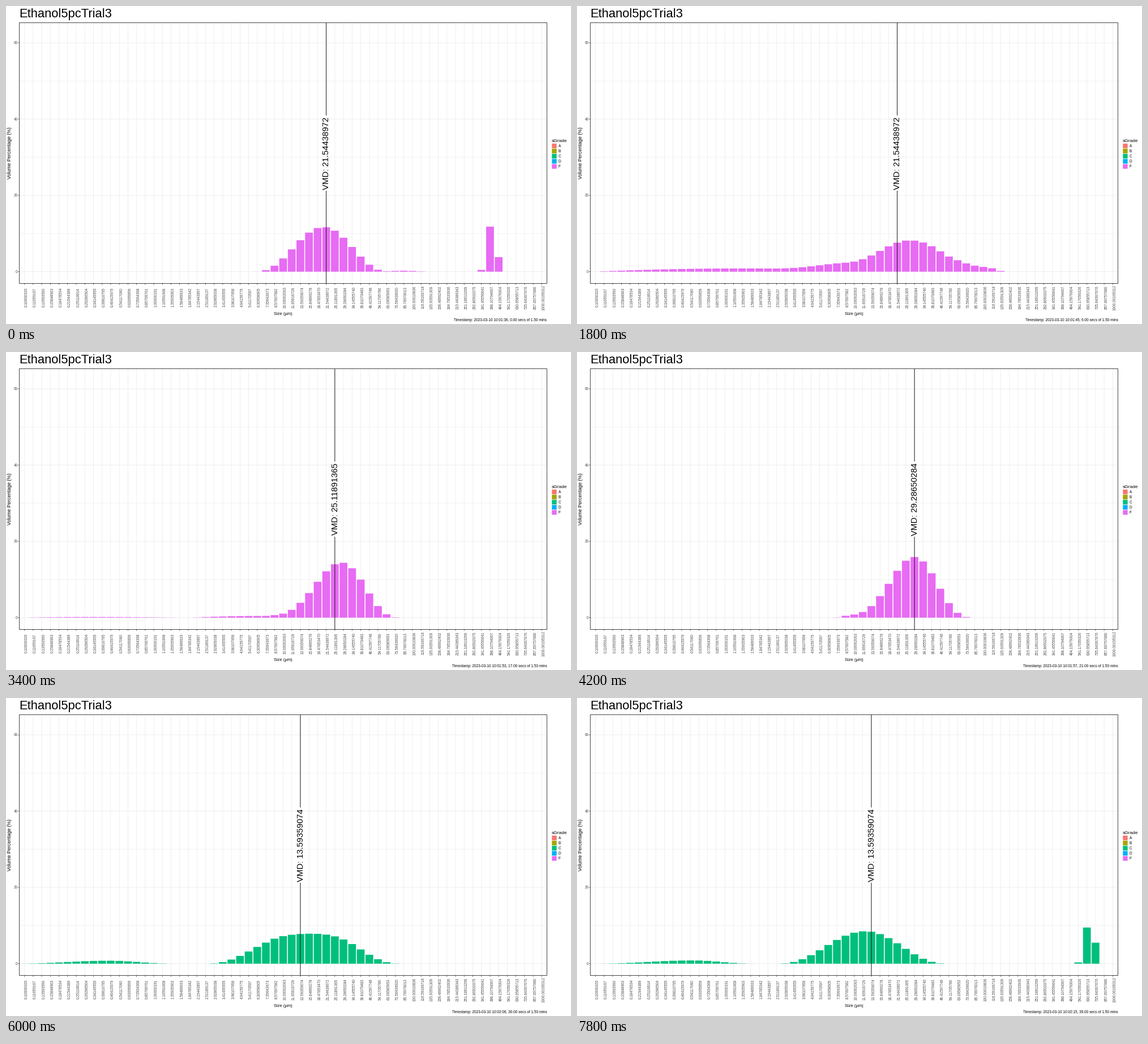
Write a matplotlib script that moves like this. It is 998 by 561 pixels and loops after 8000 ms.

```python
import numpy as np
import matplotlib.pyplot as plt
from matplotlib.animation import FuncAnimation
from matplotlib.patches import Rectangle

W, H, DPI = 998, 561, 64
PT = 72 / DPI                        # points per pixel
LEFT, RIGHT, TOP, BOTTOM = 23.5, 955.5, 29.5, 489.5
BINS = 61
STEP = (RIGHT - LEFT) / (BINS + 0.2)
ZERO, UNIT = 468.7, 6.728            # pixel row of 0 % and pixels per 1 %
SECONDS, BLANK = 40, 26
GRADES = dict(A="#F8766D", B="#A3A500", C="#00BF7D", D="#00B0F6", F="#E76BF3")

plt.rcParams["font.family"] = "Liberation Sans"
idx = np.arange(BINS)
bin_x = LEFT + (idx + 0.6) * STEP
sizes = [f"{np.float32(10 ** (i / 15 - 1) * 1.00000196):.8f}" for i in idx]


def bell(mu, height, left, right, power=3):
    """Bell over the bins that reaches zero at mu - left and mu + right."""
    u = (idx - mu) / np.where(idx < mu, left, right)
    return height * np.clip(1 - u * u, 0, 1) ** power


# second -> volume percentage in each size bin: main peak plus smaller modes
PROFILES = {
    0: bell(34.7, 11.7, 8.15, 7.8) + bell(44, .25, 4, 3.5)
       + bell(54.2, 12.5, 1.47, 1.4),
    9: bell(37.1, 7.3, 8.5, 8.8) + bell(31, 2, 11, 12)
       + bell(17, .85, 17, 20, 1) + bell(44.8, 1.2, 4, 2.4, 1),
    13: bell(36.4, 13.2, 8, 6.9) + bell(27, .9, 7.5, 6, 1)
        + bell(7.5, .36, 7.5, 10.5, 1),
    21: bell(37, 15.9, 8, 7.3, 4) + bell(31.2, .9, 3.3, 3.2, 1),
    34: bell(30.9, 10.3, 10.1, 9.5) + bell(9.8, 1.12, 11.5, 8.1),
    39: bell(31.3, 8.5, 10.5, 9.8) + bell(11.3, .85, 12, 7.6)
        + bell(57.3, 10.6, 1.57, 1.58),
}
KEYS = sorted(PROFILES)


def profile(sec):
    """Volume distribution at a given second."""
    if sec == BLANK:
        return np.zeros(BINS)
    k = min(np.searchsorted(KEYS, sec, side="right") - 1, len(KEYS) - 2)
    a, b = KEYS[k], KEYS[k + 1]
    u = (sec - a) / (b - a)
    return (1 - u) * PROFILES[a] + u * PROFILES[b]


def grade(sec):
    if 11 <= sec <= 16:
        return "D"
    return "F" if sec < 28 else "C"


fig = plt.figure(figsize=(W / DPI, H / DPI), dpi=DPI, facecolor="white")
ax = fig.add_axes([0, 0, 1, 1])
ax.set(xlim=(0, W), ylim=(H, 0))
ax.axis("off")


def label(x, y, s, size, ha="center", rot=0, color="black"):
    """Text whose capitals are centred on the given point."""
    shift = 0.35 * size
    x, y = (x + shift, y) if rot else (x, y + shift)
    return ax.text(x, y, s, fontsize=size * PT, ha=ha, va="baseline", color=color,
                   rotation=rot, rotation_mode="anchor", zorder=6)


def line(xs, ys, color, width, z=1):
    return ax.plot(xs, ys, color=color, lw=width * PT, zorder=z, snap=False,
                   solid_capstyle="butt")[0]


def rect(x, y, w, h, **style):
    ax.add_patch(Rectangle((x, y), w, h, snap=False, **style))


# grid, ticks and axis labels
GRID, DARK, GREY = "#EBEBEB", "#333333", "#4D4D4D"
for pct in range(0, 61, 10):
    y = ZERO - pct * UNIT
    major = pct % 20 == 0
    line([LEFT, RIGHT], [y, y], GRID, 0.8 if major else 0.6)
    if major:
        line([LEFT - 2.2, LEFT], [y, y], DARK, 0.8)
        label(20.8, y, str(pct), 6.5, "right", color=GREY)
for x, s in zip(bin_x, sizes):
    line([x, x], [TOP, BOTTOM], GRID, 0.8)
    line([x, x], [BOTTOM, BOTTOM + 2.2], DARK, 0.8)
    label(x + 3, 514, s, 6.5, rot=90, color=GREY)
rect(LEFT, TOP, RIGHT - LEFT, BOTTOM - TOP, fill=False, ec=DARK, lw=0.9 * PT,
     zorder=5)

label(23, 11.8, "Ethanol5pcTrial3", 22, "left")
label(489, 542.5, "Size (µm)", 7.6)
label(6.3, 259.5, "Volume Percentage (%)", 8.6, rot=90)

# legend
label(964, 237, "sGrade", 8.4, "left")
for n, (name, color) in enumerate(GRADES.items()):
    y = 246.8 + 9.05 * n
    rect(964.3, y - 4.1, 8.3, 8.2, fc=color, lw=0)
    label(976, y, name, 6.5, "left")

# moving parts
bars = ax.bar(bin_x, np.zeros(BINS), 0.9 * STEP, bottom=ZERO, lw=0, zorder=3,
              snap=False)
vmd_lines = [line([0, 0], span, "black", 0.9, 4)
             for span in ((TOP, 193), (326, BOTTOM))]
vmd_text = label(0, 259.5, "", 14.9, rot=90)
stamp = label(955.5, 554, "", 6.5, "right")


def update(sec):
    values = profile(sec)
    color = GRADES[grade(sec)]
    for bar, v in zip(bars, values):
        bar.set_height(-v * UNIT)
        bar.set_facecolor(color)

    # the marker sits on the bin that holds half of the volume
    total = np.cumsum(values)
    shown = total[-1] > 0
    mid = int(np.searchsorted(total, total[-1] / 2))
    for part in vmd_lines:
        part.set_xdata([bin_x[mid]] * 2)
        part.set_visible(shown)
    vmd_text.set_x(bin_x[mid] - 0.5 + 0.35 * 14.9)
    vmd_text.set_text(f"VMD: {sizes[mid]}")
    vmd_text.set_visible(shown)

    minute, second = divmod(96 + sec, 60)
    stamp.set_text(f"Timestamp: 2023-03-10 10:{minute:02d}:{second:02d}, "
                   f"{sec:.2f} secs of 1.50 mins")
    return [*bars, *vmd_lines, vmd_text, stamp]


anim = FuncAnimation(fig, update, frames=SECONDS, interval=200, repeat=True,
                     repeat_delay=0, init_func=lambda: update(0))
plt.show()
```
